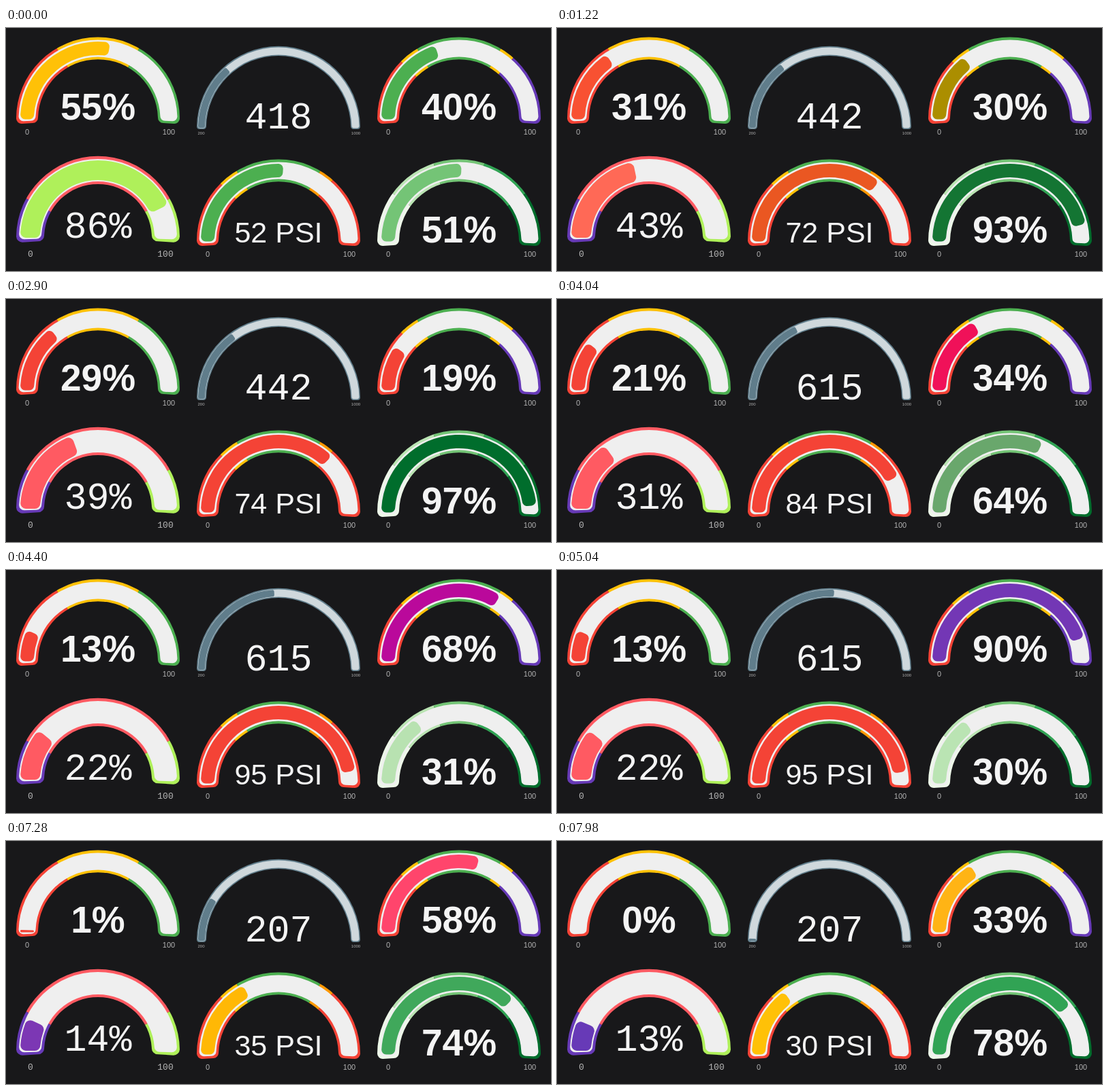
An HTML page for the animation above (8000 ms loop, 800 px wide and 358 px high).

```html
<!DOCTYPE html>
<html lang="en">
<head>
<meta charset="utf-8">
<title>Gauges</title>
<style>
  html, body { margin: 0; width: 100%; height: 100%; overflow: hidden; background: #18181a; }
  svg { display: block; width: 100%; height: 100%; }
  text { text-anchor: middle; fill: #f4f4f4; font-family: "Liberation Sans", Arial, sans-serif; }
  .mono { font-family: "Liberation Mono", "Courier New", monospace; }
  .bold { font-weight: bold; }
  .tick { fill: #b4b4b4; font-weight: normal; }
</style>
</head>
<body>
<svg id="stage" viewBox="0 0 800 358"></svg>
<script>
const LOOP = 8000, STEP = 20;
const RED = '#f44336', AMBER = '#ffc107', GREEN = '#4caf50', PURPLE = '#673ab7';

// Each update: when it becomes visible and how far its easing has already run.
const updates = [{ at: 900, lead: -3 }, { at: 3940, lead: 12 }, { at: 6960, lead: 17 }];

const base = {
  inner: 88, outer: 120, ext: 6.5, edge: 3.5, inset: 6, corner: 8, band: '#efefef',
  min: 0, max: 100, size: 55, cls: 'bold', unit: '%', drop: 1,
  tickSize: 11, tickX: 104, tickY: 23, ms: 710, power: 4
};

const gauges = [
  { cx: 135, cy: 134, values: [55, 29, 13, 0],
    stops: [33.3, 66.7], colors: [RED, AMBER, GREEN] },
  { cx: 400, cy: 147, values: [418, 442, 615, 207], min: 200, max: 1000,
    stops: [], colors: ['#607d8b'], band: '#cfd8dc', inner: 106, ext: 2, edge: 1.5, inset: 2, corner: 4,
    cls: 'mono', unit: '', instant: true, tickSize: 6, tickX: 113.5, tickY: 10, ms: 800, power: 2 },
  { cx: 665, cy: 134, values: [40, 19, 93, 30], ms: 2000, leads: [-3, 12, 41],
    stops: [25, 33, 67, 73], colors: [RED, AMBER, GREEN, AMBER, PURPLE] },
  { cx: 135, cy: 309, values: [86, 39, 22, 13], inner: 79, ext: 6, edge: 4, corner: 9,
    stops: [16, 84], colors: [PURPLE, '#ff5a62', '#aff05a'],
    cls: 'mono', drop: 0, tickSize: 13, tickX: 99, tickY: 28 },
  { cx: 400, cy: 314, values: [52, 74, 95, 30], size: 43, cls: '', unit: ' PSI', drop: 2,
    stops: [25, 33, 67, 73], colors: [RED, AMBER, GREEN, '#ff9800', RED] },
  { cx: 665, cy: 314, values: [51, 97, 30, 78], drop: 2,
    stops: [20, 40, 60, 80], colors: ['#edf8e9', '#bae4b3', '#74c476', '#31a354', '#006d2c'] }
].map(g => ({ ...base, ...g }));

const stage = document.getElementById('stage');

function add(parent, tag, attrs = {}, text = '') {
  const el = document.createElementNS('http://www.w3.org/2000/svg', tag);
  for (const k in attrs) el.setAttribute(k, attrs[k]);
  el.textContent = text;
  return parent.appendChild(el);
}

// Ring sector with rounded corners; angles run clockwise from the top.
function sector(g, r0, r1, a0, a1, corner) {
  const k = Math.max(0, Math.min(corner, (r1 - r0) / 2, (a1 - a0) * r0 / 2));
  const i = k / r0, o = k / r1;
  const p = (r, a) => (g.cx + r * Math.sin(a)).toFixed(2) + ' ' + (g.cy - r * Math.cos(a)).toFixed(2);
  const big = d => a1 - a0 - 2 * d > Math.PI ? 1 : 0;
  const turn = `A${k} ${k} 0 0 1 `;
  return `M${p(r1, a0 + o)}A${r1} ${r1} 0 ${big(o)} 1 ${p(r1, a1 - o)}` +
    turn + p(r1 - k, a1) + 'L' + p(r0 + k, a1) + turn + p(r0, a1 - i) +
    `A${r0} ${r0} 0 ${big(i)} 0 ${p(r0, a0 + i)}` +
    turn + p(r0 + k, a0) + 'L' + p(r1 - k, a0) + turn + p(r1, a0 + o) + 'Z';
}

// Whole band, shrunk on every side.
function band(g, by) {
  const h = g.half - by / g.mid;
  return sector(g, g.inner + by, g.outer - by, -h, h, g.corner - by / 3);
}

const zoneColor = (g, v) => g.colors[g.stops.filter(s => v >= s).length];

function build(g, n) {
  g.mid = (g.inner + g.outer) / 2;
  g.half = Math.PI / 2 + g.ext / g.mid;
  const clip = add(stage, 'clipPath', { id: 'band' + n });
  add(clip, 'path', { d: band(g, 0) });
  const ring = add(stage, 'g', { 'clip-path': `url(#band${n})` });
  const angle = v => (v / 50 - 1) * (g.half - g.inset / g.mid);
  g.colors.forEach((fill, i) => {
    const a0 = i ? angle(g.stops[i - 1]) : -g.half - 0.1;
    const a1 = i < g.stops.length ? angle(g.stops[i]) : g.half + 0.1;
    add(ring, 'path', { d: sector(g, g.inner - 5, g.outer + 5, a0, a1, 0), fill });
  });
  add(stage, 'path', { d: band(g, g.edge), fill: g.band });
  g.bar = add(stage, 'path');
  g.label = add(stage, 'text', { x: g.cx, y: g.cy + g.drop, class: g.cls, 'font-size': g.size });
  [[-1, g.min], [1, g.max]].forEach(([side, value]) =>
    add(stage, 'text', {
      x: g.cx + side * g.tickX, y: g.cy + g.tickY,
      class: (g.cls === 'mono' && n === 3 ? 'mono ' : '') + 'tick', 'font-size': g.tickSize
    }, value));
}

function draw(g, t) {
  const n = updates.filter(u => t >= u.at).length;
  const to = g.values[n], from = n ? g.values[n - 1] : to;
  let p = 1;
  if (n) {
    const u = updates[n - 1];
    const x = (t - u.at + (g.leads ? g.leads[n - 1] : u.lead)) / g.ms;
    p = 1 - (1 - Math.min(1, Math.max(0, x))) ** g.power;
  }
  const v = from + (to - from) * p;
  const share = (v - g.min) / (g.max - g.min);
  const h = g.half - g.inset / g.mid;
  g.bar.setAttribute('d', share < 0.002 ? '' :
    sector(g, g.inner + g.inset, g.outer - g.inset, -h, -h + 2 * h * share, g.corner - 1));
  g.bar.style.fill =
    `color-mix(in lch, ${zoneColor(g, from)}, ${zoneColor(g, to)} ${(p * 100).toFixed(2)}%)`;
  const text = (g.instant ? to : Math.round(v)) + g.unit;
  if (g.label.textContent !== text) g.label.textContent = text;
}

function render(time) {
  const t = Math.floor(time % LOOP / STEP) * STEP;
  gauges.forEach(g => draw(g, t));
}

gauges.forEach(build);
render(0);
const start = performance.now();
(function tick() {
  render(performance.now() - start);
  requestAnimationFrame(tick);
})();
</script>
</body>
</html>
```
